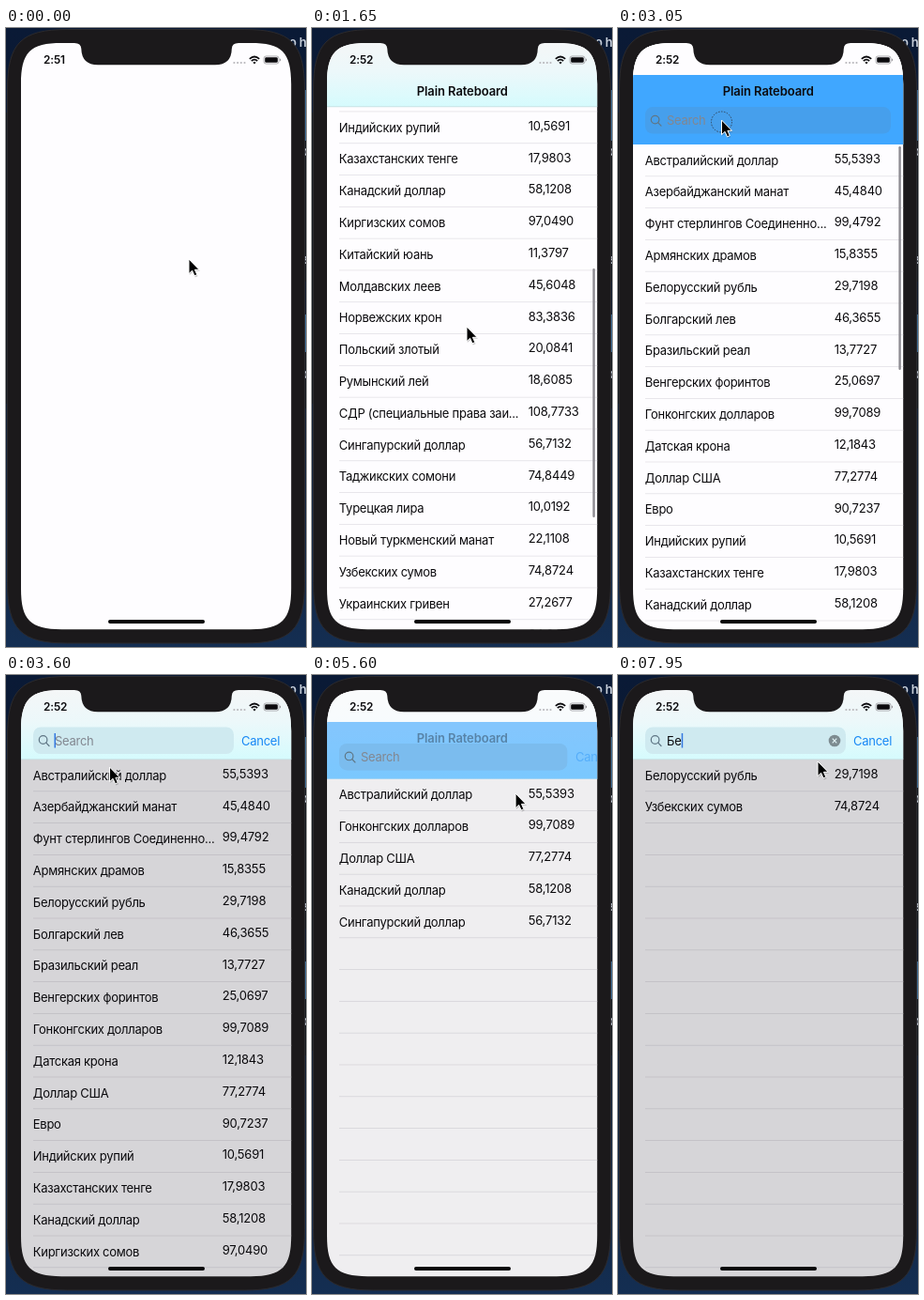
An HTML page for the animation above (8 s loop, 320x659 px).

```html
<!DOCTYPE html>
<html lang="ru">
<head>
<meta charset="utf-8">
<title>Plain Rateboard</title>
<style>
  html, body { margin: 0; width: 100%; height: 100%; overflow: hidden; background: #0f2342; }
  svg { display: block; width: 320px; height: 659px; }
  text { font: 13px Inter, "Open Sans", sans-serif; letter-spacing: -.27px; fill: #0b0a0d; white-space: pre; }
  .rate { letter-spacing: -.2px; }
  .title { font-weight: 600; text-anchor: middle; letter-spacing: -.1px; }
  .clock { font-weight: 600; font-size: 11.8px; letter-spacing: -.1px; }
  .desk { font-weight: 600; fill: #c9d1dc; }
</style>
</head>
<body>
<svg viewBox="0 0 320 659" xmlns="http://www.w3.org/2000/svg">
  <defs>
    <clipPath id="screen"><path id="glass"/></clipPath>
    <linearGradient id="desk" x2="0" y2="1">
      <stop offset="0" stop-color="#0a1a36"/><stop offset=".5" stop-color="#0e1828"/><stop offset="1" stop-color="#142e52"/>
    </linearGradient>
    <linearGradient id="ice" x2="0" y2="1">
      <stop offset="0" stop-color="#f4f6f7"/><stop offset=".45" stop-color="#ecf8fa"/><stop offset="1" stop-color="#d5fbfd"/>
    </linearGradient>
  </defs>

  <rect width="320" height="659" fill="url(#desk)"/>
  <path d="M318 66h2v54h-2zM318 305h2v40h-2z" fill="#3c6a91"/>
  <path d="M318 120h2v150h-2zM318 345h2v60h-2zM0 90h2v310h-2z" fill="#11161d"/>
  <text class="desk" x="302" y="20">o h</text>
  <text class="desk" x="317" y="136">c</text>
  <text class="desk" x="317" y="251">s</text>
  <text class="desk" x="317" y="373">c</text>
  <path id="body" fill="#1b191b" stroke="#2b2a2e"/>

  <g clip-path="url(#screen)">
    <rect width="320" height="659" fill="#fefdff"/>
    <g id="app">
      <g id="list"></g>
      <rect id="dim" x="16" width="289" height="600" fill="#040008"/>
      <rect id="thumb" x="299.4" width="2.4" rx="1.2" fill="#8d8b91"/>
      <rect id="bar" x="16" y="16" width="289" fill="url(#ice)"/>
      <g id="blue">
        <rect x="16" y="16" width="289" height="35" fill="#fefdff"/>
        <rect id="blueFill" x="16" y="50" width="289" fill="#40a7ff"/>
      </g>
      <rect id="edge" x="16" width="289" height=".7" fill="#c4d6da"/>
      <text id="title" class="title" x="160.3" y="71.7">Plain Rateboard</text>
      <g id="search">
        <rect id="field" x="29" y="-14.5" height="28.5" rx="8"/>
        <g fill="none" stroke="#5f7685" stroke-width="1.2" stroke-linecap="round">
          <circle cx="39.6" cy="-1" r="4.3"/><path d="M42.8 2.2 46 5.5"/>
        </g>
        <text id="hint" x="52" y="4.6" style="fill:#828790">Search</text>
        <text id="query" x="52" y="4.6"></text>
        <rect id="caret" y="-8" width="1.5" height="15.5" fill="#3478e0"/>
        <g id="clear">
          <circle cx="231" r="6.3" fill="#7d8b90"/>
          <path d="M228.7-2.3l4.6 4.6m0-4.6l-4.6 4.6" stroke="#e0f3f6" stroke-width="1.2"/>
        </g>
        <text id="cancel" y="4.6" style="fill:#1687f5">Cancel</text>
      </g>
    </g>
    <text id="clock" class="clock" x="40" y="38.2"></text>
    <g fill="#b9b8bc">
      <circle cx="243.4" cy="37" r="1.1"/><circle cx="247.1" cy="37" r="1.1"/>
      <circle cx="250.8" cy="37" r="1.1"/><circle cx="254.5" cy="37" r="1.1"/>
    </g>
    <g fill="none" stroke="#0b0a0d" stroke-width="1.7">
      <path d="M259.8 32.8q5.2-4.6 10.4 0M261.8 35q3.2-2.8 6.4 0"/>
      <path d="M265 38.4l-1.6-1.7q1.6-1.3 3.2 0z" fill="#0b0a0d" stroke="none"/>
    </g>
    <rect x="275" y="30" width="16" height="8" rx="2.3" fill="none" stroke="#99979c" stroke-width=".8"/>
    <rect x="276.2" y="31.2" width="13.6" height="5.6" rx="1.3" fill="#0b0a0d"/>
    <path d="M292 32.6q1.2.5 1.2 1.4t-1.2 1.4z" fill="#99979c"/>
    <rect x="109" y="630" width="103" height="4" rx="2" fill="#050506"/>
  </g>
  <path d="M73 14V16Q80 16 80.3 22Q80.8 39.3 98 39.3H223Q240.5 39.3 240.8 22Q241 16 248 16V14z" fill="#1b191b"/>

  <circle id="ring" r="11" fill="none" stroke="#31445a" stroke-width="1" stroke-dasharray="1.5 1.5"/>
  <g id="cursor">
    <path d="M.8 1.8V17L4.4 13.7 6.8 19.4 9.6 18.2 7.2 12.7H12z" opacity=".2"/>
    <path d="M0 0V15.6L3.6 12.3 6 17.8 8.8 16.6 6.4 11.3H11z" stroke="#fff" stroke-width="1"/>
  </g>
</svg>
<script>
const LOOP = 8000, PITCH = 33.8, SLOTS = 38;
const NS = 'http://www.w3.org/2000/svg';
const $ = id => document.getElementById(id);

const rates = `Австралийский доллар|55,5393
Азербайджанский манат|45,4840
Фунт стерлингов Соединенно...|99,4792
Армянских драмов|15,8355
Белорусский рубль|29,7198
Болгарский лев|46,3655
Бразильский реал|13,7727
Венгерских форинтов|25,0697
Гонконгских долларов|99,7089
Датская крона|12,1843
Доллар США|77,2774
Евро|90,7237
Индийских рупий|10,5691
Казахстанских тенге|17,9803
Канадский доллар|58,1208
Киргизских сомов|97,0490
Китайский юань|11,3797
Молдавских леев|45,6048
Норвежских крон|83,3836
Польский злотый|20,0841
Румынский лей|18,6085
СДР (специальные права заи...|108,7733
Сингапурский доллар|56,7132
Таджикских сомони|74,8449
Турецкая лира|10,0192
Новый туркменский манат|22,1108
Узбекских сумов|74,8724
Украинских гривен|27,2677
Чешских крон|34,6409
Шведских крон|88,9270
Швейцарский франк|83,7712
Южноафриканских рэндов|52,9541
Вон Республики Корея|69,1427
Японских иен|70,5716`.split('\n').map(line => line.split('|'));

// Hard changes: [start, value]
const queries = [[0, ''], [4050, 'Д'], [4300, 'До'], [4500, 'Дол'], [5400, ''], [7000, 'Б'], [7600, 'Бе']];
const filters = [[0, ''], [4250, 'д'], [4450, 'до'], [4600, 'дол'], [7300, 'б'], [7850, 'бе']];
// Eased changes: [time, value, ...]
const active = [[3100, 0], [3500, 1], [5400, 1], [5750, 0], [6510, 0], [6880, 1]];
const pointer = [[200, 195, 246], [250, 194, 270], [500, 194, 270], [1200, 165, 318], [2150, 165, 318],
  [2400, 187, 112], [2800, 110.5, 98], [5000, 110.5, 98], [5300, 268, 68], [5450, 268, 68],
  [5800, 140, 214], [6150, 140, 214], [6450, 120, 97], [7300, 120, 97], [7600, 213, 92]];

const clamp = v => Math.min(1, Math.max(0, v));
const part = (t, a, b) => clamp((t - a) / (b - a));
const mix = (a, b, k) => a + (b - a) * k;
const smooth = k => k * k * (3 - 2 * k);
const latest = (table, t) => table.filter(step => step[0] <= t).pop()[1];

function track(keys, t, col = 1) {
  const i = keys.findIndex(key => key[0] > t);
  if (i === 0) return keys[0][col];
  if (i < 0) return keys[keys.length - 1][col];
  const [a, b] = [keys[i - 1], keys[i]];
  return mix(a[col], b[col], smooth(part(t, a[0], b[0])));
}

function scrollAt(t) {
  return t < 2100
    ? 655 * (1 - (1 - part(t, 1300, 2050)) ** 1.77)
    : 655 * (1 - part(t, 2100, 2950)) ** 2.93;
}

// Rectangle with continuous-curvature corners
function squircle(x, y, w, h, radius) {
  const e = radius * 1.4, c = e * .775, k = e - c;
  return `M${x + e} ${y}h${w - 2 * e}c${c} 0 ${e} ${k} ${e} ${e}v${h - 2 * e}` +
    `c0 ${c} ${-k} ${e} ${-e} ${e}h${2 * e - w}c${-c} 0 ${-e} ${-k} ${-e} ${-e}` +
    `v${2 * e - h}c0 ${-c} ${k} ${-e} ${e} ${-e}z`;
}

function add(parent, tag, attrs, text) {
  const el = document.createElementNS(NS, tag);
  set(el, attrs);
  if (text) el.textContent = text;
  parent.append(el);
  return el;
}
function set(el, attrs) {
  for (const name in attrs) el.setAttribute(name, attrs[name]);
}
const show = (el, on) => { el.style.display = on ? '' : 'none'; };
const move = (el, x, y) => el.setAttribute('transform', `translate(${x} ${y})`);

set($('glass'), { d: squircle(16, 16, 288.2, 624.2, 31) });
set($('body'), { d: squircle(1.5, 1.5, 317, 653.5, 46) });

const list = $('list');
const marked = add(list, 'rect', { x: 16, y: 2 * PITCH, width: 289, height: PITCH, fill: '#d1cfd4' });
for (let i = 1; i <= SLOTS; i++)
  add(list, 'rect', { x: 29, y: i * PITCH - .4, width: 276, height: .8, fill: '#e3e1e6' });
const rows = rates.map(([name, rate]) => {
  const el = add(list, 'g', {});
  add(el, 'text', { x: 28.8, y: 21.6 }, name);
  add(el, 'text', { x: 230.7, y: 19.9, class: 'rate' }, rate);
  return { el, key: name.toLowerCase() };
});

function draw(t) {
  const a = track(active, t), s = scrollAt(t), fold = Math.min(s, 40);
  const bottom = mix(124 - fold, 90, a);

  $('clock').textContent = t < 500 ? '2:51' : '2:52';
  set($('app'), { opacity: part(t, 450, 700) });

  const filter = latest(filters, t);
  let slot = 0;
  for (const row of rows) {
    const on = row.key.includes(filter);
    show(row.el, on);
    if (on) move(row.el, 0, PITCH * slot++);
  }
  move(list, 0, mix(124, 90, a) - s);
  show(marked, t >= 5900 && t < 7300);
  set($('dim'), { y: bottom, opacity: .155 * a });

  set($('thumb'), {
    y: s < 40 ? 126 - s : 86 + (s - 40) * .424,
    height: 238 + 27 * fold / 40,
    opacity: part(t, 1300, 1400) * (1 - part(t, 3150, 3500))
  });

  const blue = (1 - a) * (1 - part(s, 28, 42));
  set($('bar'), { height: bottom - 16 });
  set($('blue'), { opacity: blue });
  set($('blueFill'), { height: bottom - 50 });
  set($('edge'), { y: bottom - .5, opacity: 1 - blue });
  set($('title'), { opacity: 1 - part(a, 0, .6) });

  move($('search'), 0, mix(98.6 - fold / 2, 70, a));
  set($('search'), { opacity: mix(1 - part(s, 0, 22), 1, a) });
  const tint = [[70, 207], [159, 234], [236, 240]].map(([from, to]) => Math.round(mix(from, to, a)));
  set($('field'), { width: mix(262, 214, a), fill: `rgb(${tint})` });

  const query = latest(queries, t);
  $('query').textContent = query;
  show($('hint'), !query);
  show($('clear'), query);
  set($('caret'), { x: query ? 52.3 + $('query').getComputedTextLength() : 51.5 });
  show($('caret'), (t >= 3150 && t < 5400) || t >= 6480);
  set($('cancel'), { x: mix(300, 251, a), opacity: a });

  const x = track(pointer, t, 1), y = track(pointer, t, 2);
  move($('cursor'), x, y);
  move($('ring'), x, y + 2);
  show($('ring'), t >= 3000 && t < 3100);
}

function tick() {
  draw(performance.now() % LOOP);
  requestAnimationFrame(tick);
}
tick();
</script>
</body>
</html>
```
